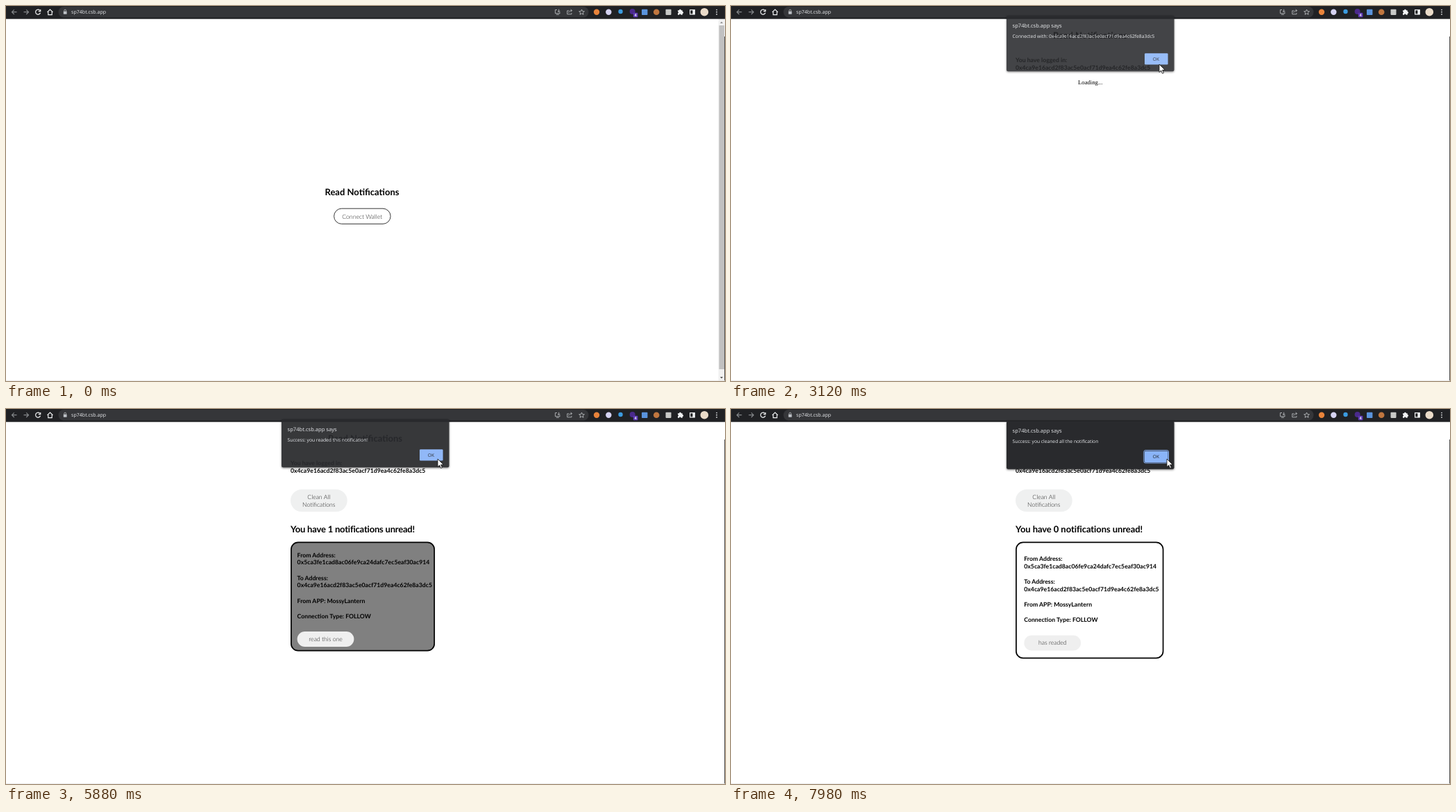
Write an HTML page that moves like this. It is 1036 px wide and 541 px high and loops after 8 s.

```html
<!DOCTYPE html>
<html lang="en">
<head>
<meta charset="utf-8">
<title>Read Notifications</title>
<style>
html, body { margin: 0; width: 100%; height: 100%; overflow: hidden; background: #fff; }
svg { display: block; width: 100vw; height: 100vh; }
text { text-rendering: geometricPrecision; white-space: pre; }
.head { font: 700 13px Lato, sans-serif; }
.bold { font: 700 8.7px Lato, sans-serif; }
.btn { font: 300 8.7px Lato, sans-serif; fill: #222; text-anchor: middle; }
.mid { text-anchor: middle; }
.serif { font: 8.7px "Liberation Serif", serif; }
.ui { font-family: "Open Sans", "Noto Sans", sans-serif; fill: #e8eaed; }
.line { fill: none; stroke: #f1f3f4; stroke-width: 1.2; }
.thin { fill: none; stroke: #c4c7ca; stroke-width: .8; }
#dialog { filter: drop-shadow(0 1px 1.6px rgba(0, 0, 0, .55)); }
</style>
</head>
<body>
<svg id="stage" viewBox="0 0 1036 541" xmlns="http://www.w3.org/2000/svg"></svg>
<script>
const LOOP = 8000;
const HOST = "sp74bt.csb.app";
const USER = "0x4ca9e16acd2f83ac5e0acf71d9ea4c62fe8a3dc5";
const SENDER = "0x5ca3fe1cad8ac06fe9ca24dafc7ec5eaf30ac914";
const APP = "MossyLantern";

const text = (x, y, cls, str, extra = "") => `<text x="${x}" y="${y}" class="${cls}" ${extra}>${str}</text>`;
const box = (x, y, w, h, r, fill, extra = "") =>
  `<rect x="${x}" y="${y}" width="${w}" height="${h}" rx="${r}" fill="${fill}" ${extra}/>`;
const dot = (x, y, r, fill) => `<circle cx="${x}" cy="${y}" r="${r}" fill="${fill}"/>`;
const path = (d, cls, extra = "") => `<path d="${d}" class="${cls}" ${extra}/>`;
const group = (id, body) => `<g id="${id}">${body}</g>`;

function toolbar() {
  const dim = 'style="stroke:#85888b"';
  return box(0, 0, 1036, 18.7, 0, "#202124") + box(75.5, 1, 764, 15.4, 7.7, "#353639") +
    path("M15.5 8.7H8.6M11.8 5.4 8.5 8.7l3.3 3.3", "line", dim) +
    path("M25.5 8.7h6.9M29.2 5.4l3.3 3.3-3.3 3.3", "line", dim) +
    path("M48.8 6.3A3.5 3.5 0 1 0 49.5 9.7M49.7 4.9V7.7H46.8", "line") +
    path("M59.5 8.9 63.5 5l4 3.9M60.8 8.2v4.4h5.4V8.2", "line") +
    box(82.8, 7.8, 4.8, 4, .6, "#bdc1c6") + path("M83.8 8V6.6a1.4 1.4 0 0 1 2.8 0V8", "thin") +
    text(94, 11.3, "ui", HOST, 'font-size="7.1"') +
    path("M794 5.5h-2.6v5.2h6.6V9M792.8 12.3h4M796.6 4.7v4M794.8 7l1.8 1.8L798.4 7", "thin") +
    path("M811 6.8h-2.3v5h6.2V10M810.8 9.8c.2-2.4 1.8-3.2 4.6-3.2M813.6 4.8l2 1.8-2 1.9", "thin") +
    path("M829.5 5l1.1 2.6 2.8.2-2.1 1.8.7 2.7-2.5-1.5-2.5 1.5.7-2.7-2.1-1.8 2.8-.2Z", "thin") +
    dot(851, 8.8, 4.2, "#e8833a") + dot(868.3, 8.8, 4.2, "#d5d3f2") + dot(885.5, 8, 3.2, "#3b9be0") +
    dot(902.6, 8, 4, "#4a2a8c") + box(903.8, 9.8, 6.6, 6.4, 1, "#5d39b5") +
    text(907.1, 15.1, "ui mid", "4", 'font-size="5.5" font-weight="700"') +
    box(916, 4.8, 8.4, 8.2, .8, "#5a93dc") + dot(937.2, 8.8, 4.3, "#c0763f") +
    box(950.5, 4.7, 8, 8.2, .8, "#c8c9c7") +
    path("M968 6.2h2a1.4 1.4 0 0 1 2.8 0h1.9v2a1.4 1.4 0 0 1 0 2.8v1.8h-2.2a1.2 1.2 0 0 0-2.4 0H968v-2.2a1.3 1.3 0 0 0 0-2.5Z", "", 'fill="#f1f3f4"') +
    path("M985.6 5.6h6.6v6.3h-6.6Z", "line") + box(989.4, 5.2, 3, 7, 0, "#f1f3f4") +
    dot(1006.3, 8.7, 5.8, "#eadbc9") +
    [5.5, 8.7, 11.9].map(y => dot(1024, y, .85, "#f1f3f4")).join("");
}

function scrollbar() {
  return box(1026.5, 18.7, 9.5, 522, 0, "#f1f1f1") + box(1027.4, 28, 7.6, 496, 0, "#c1c1c1") +
    path("M1029 25l2-2.4 2 2.4Z", "", 'fill="#8b8b8b"') + path("M1029 535l2 2.4 2-2.4Z", "", 'fill="#505050"');
}

function card(x, dy, w, h, fill, label) {
  const rows = [["From Address:", 213.7], [SENDER, 224.4], ["To Address:", 246.7], [USER, 257.3],
    ["From APP: " + APP, 279.6], ["Connection Type: FOLLOW", 301.6]];
  return box(410.9, 192.4, w, h, 10, fill, 'stroke="#000" stroke-width="1.7"') +
    rows.map(([s, y]) => text(x, y + dy, "bold", s)).join("") +
    box(x, 321 + dy, 81.8, 22, 11, "#efefef") + text(x + 41, 334.9 + dy, "btn", label);
}

const count = (n, gap) => text(410, 177.6, "head", `You have ${n} notifications unread!`, `letter-spacing="${gap}"`);

function hand() {
  return path("M-1.2 9.2V1.2a1.2 1.2 0 0 1 2.4 0V5.6l1.2-.2 1 .6 1.4-.1.9.7 1 .1.6 1v3.8l-1.2 2.2V16H.2L-3.8 10.6c-.6-1.3.6-2 1.4-1.3ZM2 11v2.6M3.7 11v2.6M5.4 11v2.6",
    "", 'fill="#fff" stroke="#111" stroke-width=".8" stroke-linejoin="round"');
}

const arrow = path("M0 0V11.6L2.7 9.1 4.6 13.4 6.5 12.6 4.6 8.4H8.3Z", "",
  'fill="#fff" stroke="#111" stroke-width=".8" stroke-linejoin="round"');

const stage = document.getElementById("stage");
stage.innerHTML = box(0, 0, 1036, 541, 0, "#fff") +
  group("login", scrollbar() + text(513, 273, "head mid", "Read Notifications") +
    box(472.6, 292.2, 81.5, 22.2, 11.1, "#fff", 'stroke="#222" stroke-width=".9"') +
    text(513.2, 306.5, "btn", "Connect Wallet")) +
  group("account", text(517.6, 46.8, "head mid", "Read Notifications") +
    text(410, 80.9, "bold", "You have logged in:") + text(410, 91.7, "bold", USER)) +
  group("loading", text(500, 112.8, "serif", "Loading...")) +
  group("clean", box(410, 116, 81.7, 32.2, 16.1, "#eff0f0") +
    text(450.8, 130.1, "btn", "Clean All") + text(450.8, 141, "btn", "Notifications")) +
  group("unread", count(1, -.2) + card(419.6, 0, 206.3, 156.3, "#808080", "read this one")) +
  group("read", count(0, -.07) + card(422.3, 5.5, 211.7, 167, "#fff", "has readed")) +
  box(1035, 44, 1, 497, 0, "#555") + box(0, 540.3, 1036, .7, 0, "#e4e4e4") +
  toolbar() +
  group("dialog", `<rect id="panel" x="397" y="17.3" width="241.5" rx="2.2" fill="#292a2d"/>` +
    text(405.6, 34.3, "ui", HOST + " says", 'font-size="7.6"') +
    text(405.6, 49.3, "ui", "", 'id="message" font-size="6.72"') +
    group("ok", box(594.9, -9.1, 35.6, 18.4, 2.2, "#292a2d", 'id="ring" stroke="#8ab4f8" stroke-width="1"') +
      box(596, -8, 33.6, 16.4, 1.4, "#8ab4f8") +
      text(612.4, 2.5, "ui mid", "OK", 'font-size="6.6" style="fill:#202124"'))) +
  group("cursor", group("arrow", arrow) + group("hand", hand()));

const el = {};
stage.querySelectorAll("[id]").forEach(n => el[n.id] = n);
const show = (id, on) => el[id].style.display = on ? "" : "none";

// time, x, y of the pointer tip
const TRACK = [
  [70, 997, 528], [300, 785, 382], [630, 785, 382], [1400, 530, 284], [1650, 524, 299],
  [2050, 524, 299], [2560, 610, 80], [2800, 617, 84], [3240, 617, 84], [3960, 484, 322],
  [4200, 478, 328], [4600, 478, 328], [4770, 500, 280], [5410, 622, 72], [5980, 622, 72],
  [6540, 563, 138], [6810, 475, 131], [7000, 475, 131], [7080, 470, 123], [7210, 470, 123],
  [7280, 489, 135], [7360, 494, 136], [7860, 628, 72], [8000, 628, 72]
];

const DIALOGS = [
  { open: 1850, close: 3043, h: 80.5, msg: "Connected with: " + USER },
  { open: 4690, close: 5825, h: 69.5, msg: "Success: you readed this notification!" },
  { open: 7276, close: 9999, h: 69.5, msg: "Success: you cleaned all the notification" }
];

const clamp = v => Math.max(0, Math.min(1, v));
const smooth = p => p * p * (3 - 2 * p);

function pointer(t) {
  const i = Math.max(1, TRACK.findIndex(k => k[0] > t));
  const [a, b] = [TRACK[i - 1], TRACK[i]];
  const p = smooth(clamp((t - a[0]) / (b[0] - a[0])));
  return [a[1] + (b[1] - a[1]) * p, a[2] + (b[2] - a[2]) * p];
}

function drawDialog(t) {
  const d = DIALOGS.find(k => t >= k.open && t < k.close + 220);
  show("dialog", d);
  if (!d) return;
  const p = clamp((t - d.open) / 200), q = clamp((t - d.close) / 220);
  const dy = -11 * (1 - p) ** 2 - 10 * q;
  el.dialog.setAttribute("transform", `translate(0 ${dy})`);
  el.dialog.setAttribute("opacity", Math.min(1, p * 1.5) * (1 - q * q));
  el.panel.setAttribute("height", d.h);
  el.ok.setAttribute("transform", `translate(0 ${d.h - .8})`);
  el.message.textContent = d.msg;
  show("ring", t < d.close - 80);
}

function drawCursor(t, login, loaded, unread) {
  const [x, y] = pointer(t);
  const over = (l, top, r, b) => x > l && x < r && y > top && y < b;
  const hot = login && over(472, 292, 554, 315) ||
    loaded && over(410, 116, 492, 148) || unread && over(420, 321, 502, 343);
  show("cursor", t >= 70);
  show("hand", hot);
  show("arrow", !hot);
  el.cursor.setAttribute("transform", `translate(${x} ${y})`);
}

function draw(t) {
  const login = t < 3100, loaded = t >= 3500, read = t >= 5960;
  show("login", login);
  show("account", !login);
  show("loading", !login && !loaded);
  show("clean", loaded);
  show("unread", loaded && !read);
  show("read", read);
  drawDialog(t);
  drawCursor(t, login, loaded, loaded && !read);
}

function tick() {
  draw(performance.now() % LOOP);
  requestAnimationFrame(tick);
}
draw(0);
requestAnimationFrame(tick);
</script>
</body>
</html>
```
